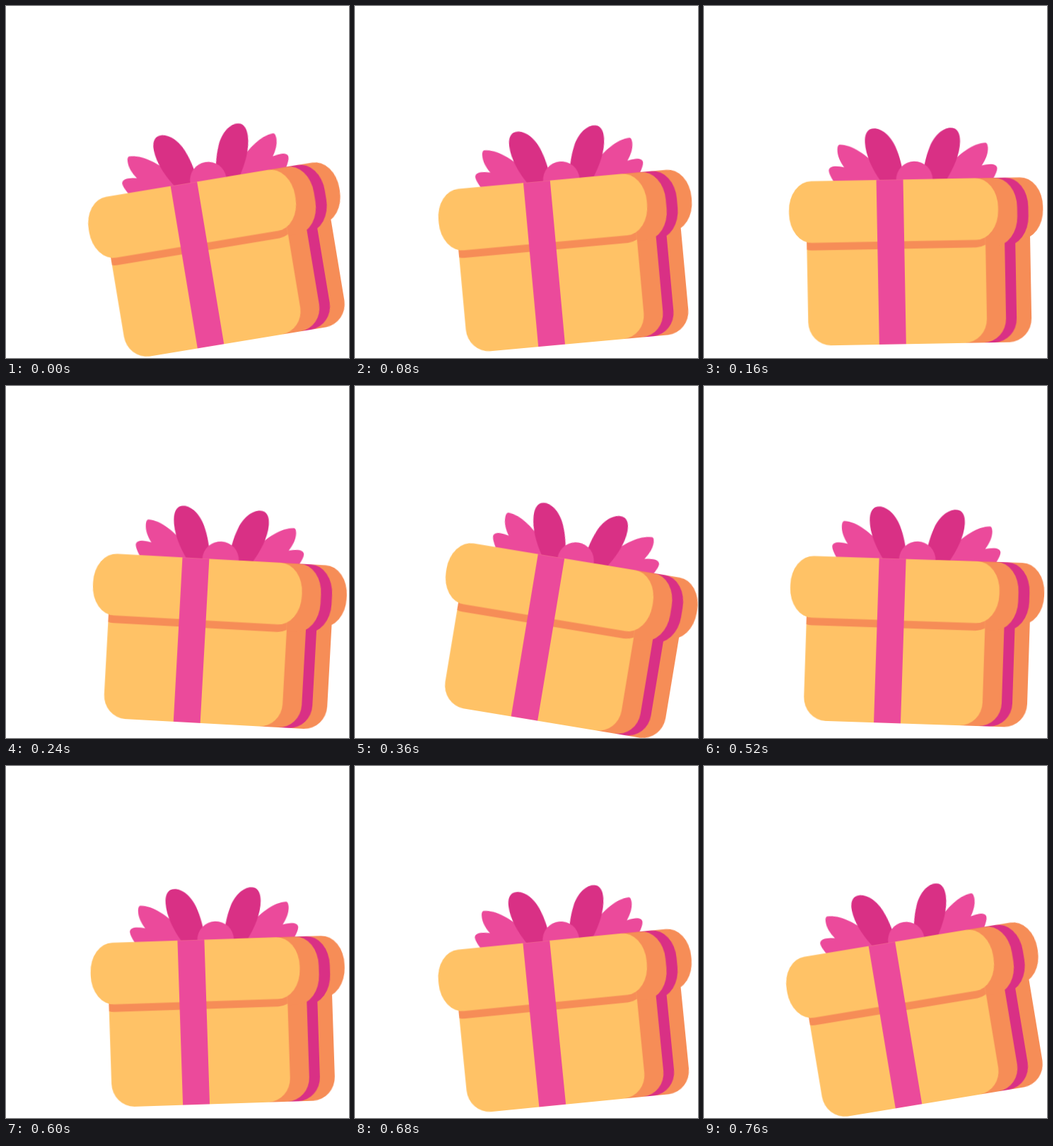
Recreate the animation shown at these times as an HTML page. Size 485x498 px, loop 800 ms.

```html
<!DOCTYPE html>
<html lang="en">
<head>
<meta charset="utf-8">
<title>Rocking gift box</title>
<style>
  html, body { margin: 0; width: 100%; height: 100%; overflow: hidden; background: #fff; }
  svg { display: block; width: 485px; height: 498px; }
  .yellow { fill: #ffc266; }
  .orange { fill: #f68d57; }
  .pink { fill: #eb4a9b; }
  .magenta { fill: #d93085; }
  .lid { rx: 32px; ry: 41.5px; }
  .body { rx: 31.5px; ry: 33.5px; }

  /* Linear swing at 25 steps per second; the small lead keeps steps on their tick. */
  #gift {
    transform-origin: 297px 325px;
    animation: rock 800ms -1ms infinite;
  }
  @keyframes rock {
    0% { transform: rotate(-9.42deg); animation-timing-function: steps(9); }
    45% { transform: rotate(9.42deg); animation-timing-function: steps(10); }
    95%, 100% { transform: rotate(-9.42deg); }
  }
</style>
</head>
<body>
<svg viewBox="0 0 485 498">
  <defs>
    <g id="bow">
      <path class="pink" d="M296 250H186L184.5 246Q178.5 236 178.2 231C178 223.5 190 223.5 200 226.5C194.5 218.5 190.5 210 190.8 201C191.2 196.5 192 195 194 194.3C212 194.5 233 210.5 247 226.5L262 246Z"/>
      <path class="magenta" d="M253 250L250.5 246C240.5 231 230.5 210 230 192C229.8 182.5 232 176.5 237 173.5C249.5 168.5 265 180 273 198.5C279 212.5 283 230 284 246V250Z"/>
    </g>
    <clipPath id="front"><rect class="body" x="145.2" y="270" width="252.6" height="207.9"/></clipPath>
  </defs>
  <g id="gift">
    <use href="#bow"/>
    <use href="#bow" transform="matrix(-1 0 0 1 594.5 1)"/>
    <circle class="pink" cx="299" cy="245.5" r="25.8"/>

    <!-- box slices, back to front: body, then lid -->
    <g class="orange">
      <rect class="body" x="300" y="270" width="161" height="207.9"/>
      <rect class="lid" x="300" y="245.2" width="180" height="87.4"/>
    </g>
    <g class="magenta">
      <rect class="body" x="300" y="270" width="140" height="207.9"/>
      <rect class="lid" x="300" y="245.2" width="159.2" height="96.5"/>
    </g>
    <g class="orange">
      <rect class="body" x="300" y="270" width="124.9" height="207.9"/>
      <rect class="lid" x="300" y="245.2" width="143.5" height="96.5"/>
    </g>
    <rect class="yellow body" x="145.2" y="270" width="252.6" height="207.9"/>
    <g clip-path="url(#front)">
      <rect class="orange lid" x="120.8" y="256" width="295.8" height="87.2"/>
    </g>
    <rect class="yellow lid" x="120.8" y="245.2" width="295.8" height="87.4"/>
    <rect class="pink" x="245.1" y="245.2" width="37.9" height="232.7"/>
  </g>
</svg>
</body>
</html>
```
